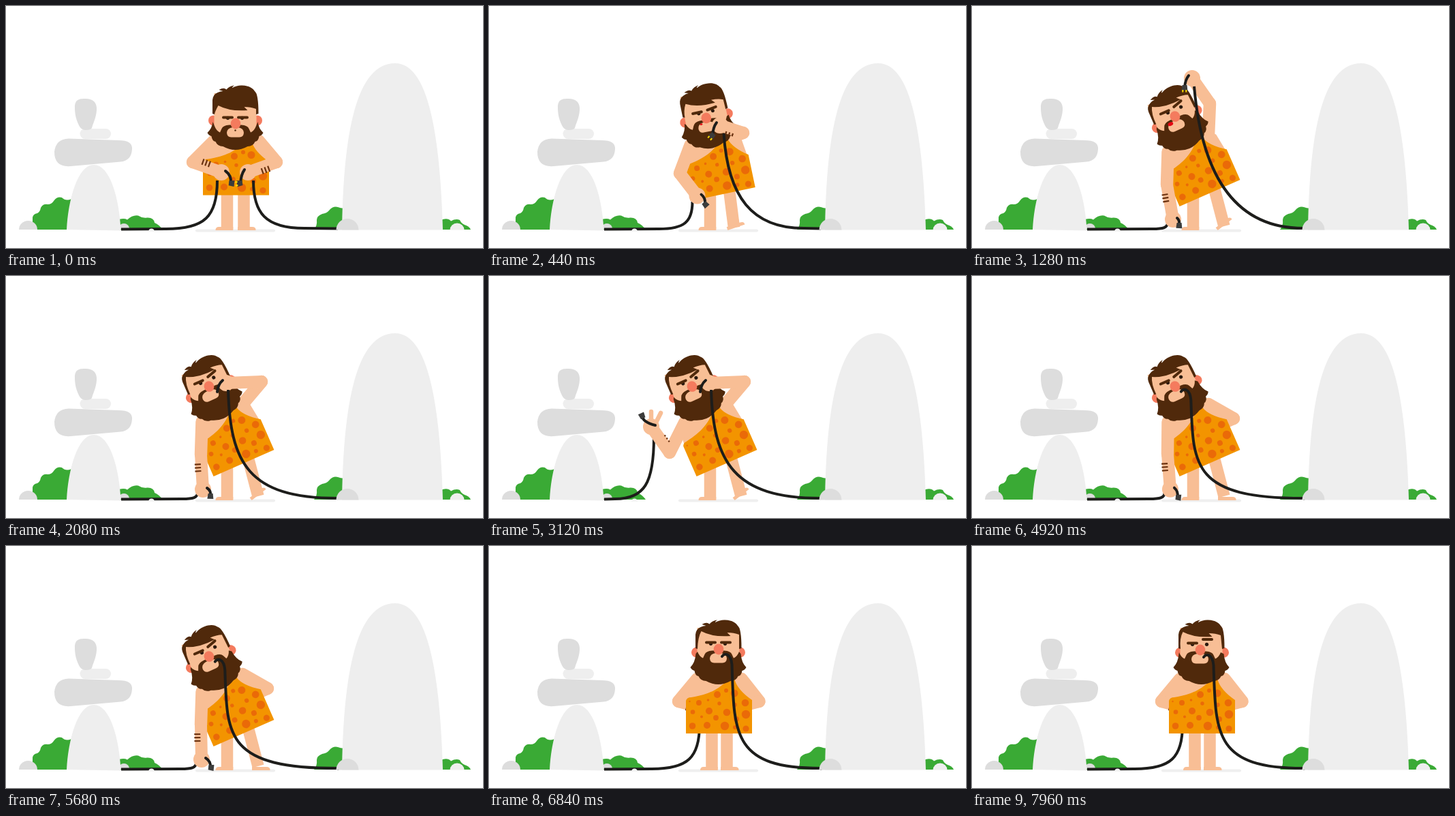
An HTML page with a canvas for the animation above (8 s loop, 700 px wide and 355 px high).

```html
<!DOCTYPE html>
<html lang="en">
<head>
<meta charset="utf-8">
<title>Caveman and cables</title>
<style>
html, body { margin: 0; width: 100%; height: 100%; overflow: hidden; background: #fff; }
canvas { display: block; }
</style>
</head>
<body>
<canvas id="stage" width="700" height="355"></canvas>
<script>
const ctx = document.getElementById('stage').getContext('2d');
const LOOP = 8000, STEP = 40, TILT = -23.7 * Math.PI / 180, GROUND = 327;
const SKIN = '#f8be95', HAIR = '#50290b', RED = '#f47b5e', CABLE = '#1d1d1b',
  LIGHT = '#eee', GREY = '#ddd', GREEN = '#3aaa35', DRESS = '#f39400', SPOT = '#ea6a08';

// Drawing helpers
function fill(color, d) {
  ctx.fillStyle = color;
  ctx.fill(new Path2D(d));
}
function disc(color, x, y, rx, ry = rx) {
  ctx.fillStyle = color;
  ctx.beginPath();
  ctx.ellipse(x, y, rx, ry, 0, 0, 7);
  ctx.fill();
}
function dome(color, x, y, r, h = r) {
  ctx.fillStyle = color;
  ctx.beginPath();
  ctx.ellipse(x, y, r, h, 0, Math.PI, 2 * Math.PI);
  ctx.fill();
}
function stroke(color, width, d, cap = 'round') {
  ctx.strokeStyle = color;
  ctx.lineWidth = width;
  ctx.lineCap = cap;
  ctx.lineJoin = 'round';
  ctx.stroke(new Path2D(d));
}
function group(x, y, angle, draw) {
  ctx.save();
  ctx.translate(x, y);
  ctx.rotate(angle);
  draw();
  ctx.restore();
}
const mix = (a, b, k) => Array.isArray(a) ? a.map((v, i) => mix(v, b[i], k))
  : typeof a === 'number' ? a + (b - a) * k : a;

// Poses: each key changes only the listed parts.
// l = left arm, r = right arm: E elbow, H hand, P plug, Turn plug angle, Front drawn over the dress, Band bracelet side
const keys = [
  { t: 0, lean: 0, drop: 2.5, neck: 5.5, look: [0, 13], brow: [1, 1, 0], eye: 0, open: 0, foot: 0,
    lE: [274, 229], lH: [316, 244], lP: [330, 260], lTurn: .1, lCable: [310, 256], lFront: true, lBand: 1, fingers: 0,
    rE: [397, 229], rH: [355, 244], rP: [344, 260], rTurn: 3, rCable: [8, 12], rFront: true, rBand: 1,
    sag: 380, bend: 0, rEnd: 438, bite: false, held: false },
  { t: 120 },
  { t: 760, lean: 1, drop: 0, neck: 0, look: [-1, 0], brow: [-1.7, -5.5, 2], eye: 4, open: 1, foot: -38,
    lE: [286, 262], lH: [295, 313], lP: [304, 321], lTurn: 1.6, lCable: [287, 318], lBand: -1,
    rE: [349, 143], rH: [323, 106], rP: [312, 119], rTurn: 1.6, rCable: [3, 12], rBand: 0,
    sag: 392, bend: 12, rEnd: 486 },
  { t: 1320 },
  { t: 1660, open: 0, eye: 2, rE: [375, 155], rH: [323, 157], rP: [310, 170], rCable: [3, 10], sag: 360, bend: 3, bite: true },
  { t: 2100, lH: [289, 313], lP: [300, 322], lCable: [281, 318], sag: 355 },
  { t: 2520, lH: [295, 313], lP: [304, 321], lCable: [287, 318], sag: 360 },
  { t: 2960, eye: 1, lE: [265, 259], lH: [238, 221], lP: [225, 206], lTurn: -2, lCable: [242, 236], lBand: -.25, fingers: 1 },
  { t: 3380, held: true },
  { t: 3760, eye: 4, lE: [287, 261], lH: [297, 312], lP: [303, 323], lTurn: 1.6, lCable: [289, 318], lBand: -1, fingers: 0,
    rE: [388, 158], rH: [407, 112], sag: 330, rBand: .5 },
  { t: 4160, foot: -8, lH: [301, 312], lP: [306, 324], lCable: [291, 318],
    rE: [392, 187], rH: [432, 212], rBand: 1, sag: 322 },
  { t: 4320, foot: 0 },
  { t: 4480, rFront: false },
  { t: 4760, rE: [384, 209], rH: [355, 222], rBand: 0, lH: [287, 313], lP: [300, 325], lTurn: .1, lCable: [279, 318] },
  { t: 5200, lH: [300, 312], lP: [306, 324], lCable: [291, 318], sag: 326 },
  { t: 5640, lE: [286, 262], lH: [287, 313], lP: [300, 325], lCable: [279, 318], sag: 322 },
  { t: 5940 },
  { t: 6240, lFront: false, lean: .5, lE: [276, 240], lH: [298, 262], lCable: [298, 280] },
  { t: 6640, lean: 0, look: [0, 0], brow: [0, 0, 0], eye: 0, lE: [278, 228], lH: [308, 236], lCable: [309, 262],
    rE: [396.5, 228], rH: [366, 236], sag: 358 },
  { t: 6900 },
  { t: 7240, look: [2, 0], sag: 361 },
  { t: 7480 },
  { t: 7800, look: [-2, 1], brow: [0, -5.5, 0], sag: 356 },
  { t: LOOP }
];
for (let i = 1; i < keys.length; i++) keys[i] = { ...keys[i - 1], ...keys[i] };

function poseAt(t) {
  const i = keys.findIndex(k => k.t > t), a = keys[i - 1], b = keys[i];
  const u = (t - a.t) / (b.t - a.t), k = u * u * (3 - 2 * u), pose = {};
  for (const name in a) pose[name] = mix(a[name], b[name], k);
  return pose;
}

function scenery() {
  fill(GREEN, 'M39,328V310Q40,305 46,304Q50,302 51,296Q54,290 61,291Q67,291 70,286Q75,279 82,281Q88,287 96,283L110,328Z');
  fill(GREEN, 'M160,315Q172,310 178,313.500Q186,306 194,307.500Q200,311.500 207,310.500Q217,310 218,318Q225,321 230,328H160Z');
  fill(GREEN, 'M452,328Q457,322 456,314Q456,308 464,305Q471,304 474,300Q480,293 487,295Q494,298 500,296V328Z');
  fill(GREEN, 'M638,314Q648,310 653,315.500Q660,311.500 666,314Q668,319 673,321Q680,323 682,328H638Z');
  dome(GREY, 32.5, 328, 13.5, 13);
  dome(GREY, 173, 327, 8);
  dome(LIGHT, 662, 328.5, 10.5, 10);
  fill(LIGHT, 'M89,328C91,285 105,233 129,233C152,233 166,280 168.5,329.5Z');
  fill(GREY, 'M92,194.500L165,197Q186,197 185,210Q184,227 168,228.500L95,235Q71,237 71,214Q73,195 92,194.500Z');
  stroke(LIGHT, 15, 'M116,187.500H146.500');
  fill(GREY, 'M101,149C101,137 107,136 117,136C127,136 134,141 133,153C132,165 128,171 126,179Q124,182 117,182Q110,182 107,175C102,165 101,156 101,149Z');
  fill(LIGHT, 'M493,328.500C495,190 513,84 571,84C620,84 637,190 641,328.500Z');
  stroke('#efefef', 4, 'M280,329.500H393');
}

function legs(p) {
  const x = 327 - 2.5 * p.lean - p.drop, footX = mix(340, 361, p.lean);
  stroke(SKIN, 17.5, `M${x},265V327`, 'butt');
  fill(SKIN, `M${x + 8.8},329H${x - 17}Q${x - 17},324 ${x - 12},324H${x + 8.8}Z`);
  stroke(SKIN, 17.5, `M${mix(349, 354, p.lean)},262L${mix(349, 370, p.lean)},${mix(327, 323, p.lean)}`, 'butt');
  group(footX, 329.5, p.foot * Math.PI / 180, () => fill(SKIN, 'M0,-.5H26.500Q27,-5.500 21,-5.500H0Z'));
}

const spots = [[-2.5, -57, 5], [10.5, -63, 3], [22.5, -59, 5.5], [-16, -49, 1.8], [-29.5, -45, 4], [-43, -47, 1.2],
  [.5, -44, 2.7], [38.5, -45, 5.3], [23, -42, 3.2], [-38.5, -31.5, 3.3], [-14.5, -33, 5], [11.5, -31, 5.3],
  [39.5, -28, 6.2], [-25.5, -24.5, 2], [-4.5, -23, 3.9], [25.5, -21, 4], [-39, -11, 4.8], [-17.5, -12, 5],
  [8.5, -11, 6.2], [23.5, -9, 3], [39.5, -7, 4.6]];

function torso() {
  fill(SKIN, 'M-33,-86H33L43,-75L47,-45H-47L-43,-75Z');
  fill(DRESS, 'M-48.500,-48Q-47,-53 -41,-53C-15,-57 0,-65 12,-78L23,-79Q27,-64 48.500,-49V0H-48.500Z');
  for (const [x, y, r] of spots) disc(SPOT, x, y, r);
}

function head(p) {
  const [lx, ly] = p.look, ear = ly * .3;
  const f = (x, y) => `${x + lx} ${y + ly}`;
  disc(RED, -32 - lx * .5, ear, 7.5);
  disc(RED, 32 - lx * .5, ear, 7.5);
  fill(SKIN, 'M-31,-36H31V24H-31Z');
  fill(HAIR, `M-33.500 -6V-26Q-33 -34 -26 -37Q-22 -39 -18 -39L-24 -41Q-17 -45 -13 -41.500Q-9 -46.500 -1.500 -47.500
    Q-5 -45 -4.500 -44Q3 -48 10 -47.500C21 -47 26 -43 28.500 -39Q34 -35 34 -6L30.500 -5L${f(30.5, -26)}
    Q${f(23, -29)} ${f(13, -29)}L${f(18, -24)}Q${f(-8, -22)} ${f(-25, -31)}Q${f(-30, -22)} -30.500 -5Z`);
  fill(HAIR, `M-33 ${2 + ear}Q-34 15 -41 22Q-39 26 -35 27Q-34 34 -29 35Q-26 42 -18 42Q-9 47 0 47
    Q9 47 18 42Q26 42 29 35Q34 34 35 27Q39 26 41 22Q34 15 33 ${2 + ear}L${f(30.5, -1)}
    Q${f(28, 6)} ${f(22.5, 8.5)}L${f(20, 3)}Q${f(18, -2)} ${f(9, -2.5)}H${-9 + lx}
    Q${f(-18, -2)} ${f(-20, 3)}L${f(-22.5, 8.5)}Q${f(-28, 6)} ${f(-30.5, -1)}Z`);
  group(lx, ly, 0, () => {
    group(-3 * p.lean, 0, 0, () => {
      fill(SKIN, 'M-12.500,9Q-12,2 -4,1H4Q12,2 12.500,9Q12,15.500 6,15.500H-6Q-12,15.500 -12.500,9Z');
      if (p.open > .1) disc('#e30613', -7, 3, 4 * p.open, 2.6 * p.open);
    });
    if (!p.held && p.lean < .3) disc(HAIR, 0, 5.5, 1.2);
    disc('#2b1a10', -11 + p.eye, -12.7 - p.lean, 2.6);
    disc('#2b1a10', 10 + p.eye, -12.7 - p.lean, 2.6);
    const [left, right, slant] = p.brow;
    stroke(HAIR, 4, `M-17.500,${left - 14.5}H-4.500`);
    stroke(HAIR, 4, `M4.500,${right - 14.5 + slant}L17.500,${right - 14.5 - slant}`);
    disc(RED, .5, -4.5, 7.3, 7.9);
  });
}

function upperArm(shoulder, elbow) {
  stroke(SKIN, 18.5, `M${shoulder}L${elbow}`);
}
function forearm(elbow, hand, band) {
  stroke(SKIN, 18, `M${elbow}L${hand}`);
  disc(SKIN, ...hand, 12);
  if (Math.abs(band) < .1) return;
  group(...elbow, Math.atan2(hand[1] - elbow[1], hand[0] - elbow[0]), () => {
    const edge = -10 * Math.sign(band), inner = edge + 9 * band;
    for (const x of [14, 19, 24]) stroke('#6b3210', 2.2, `M${x},${edge}V${inner}`, 'butt');
  });
}
function lead([x, y], [px, py], turn, plug, prongs) {
  stroke(CABLE, 4, `M${x},${y}Q${px + 1},${mix(y, py, .35)} ${px},${py}`);
  if (plug) group(px, py, turn, () => {
    fill('#3c3c3b', 'M-3,-3.500L5,-4.500V4.500L-3,3.500Z');
    if (prongs) fill('#ffde00', 'M4,-3.500H7.500V-1.500H4ZM4,1.500H7.500V3.500H4Z');
  });
}

function leftArm(p, shoulder) {
  const [x, y] = p.lCable, [hx, hy] = p.lH;
  const end = Math.max(185, x - 15 - .85 * (GROUND - y));
  stroke(CABLE, 4, `M${x},${y}C${x},${mix(y, GROUND, .75)} ${mix(x, end, .25)},${GROUND} ${end},${GROUND}L169,327.500`, 'butt');
  upperArm(shoulder, p.lE);
  forearm(p.lE, p.lH, p.lBand);
  if (p.fingers > .05) {
    stroke(SKIN, 6.5, `M${hx},${hy}l0,${-22 * p.fingers}M${hx + 4},${hy}l${10 * p.fingers},${-20 * p.fingers}`);
  }
  if (p.lFront) lead([hx + 6, hy - 2], p.lP, p.lTurn, true, false);
}

function rightCable(p, mouth) {
  const [x, y] = p.held ? [mouth[0] + 14.5, mouth[1] + 12] : [p.rH[0] + p.rCable[0], p.rH[1] + p.rCable[1]];
  const [mx, my] = mouth;
  const start = p.held ? `M${mx},${my}C${mx + 4},${my - 6} ${mx + 13},${my - 4} ${x},${y}` : `M${x},${y}`;
  stroke(CABLE, 4, `${start}C${x + p.bend},${mix(y, 326, .67)} ${p.sag},326 ${p.rEnd},326L487,326.500`, p.held ? 'round' : 'butt');
  if (!p.held) lead([p.rH[0] - 5, p.rH[1] - 4], p.rP, p.rTurn, !p.bite, true);
}

function draw(t) {
  const p = poseAt(t), angle = TILT * p.lean;
  const x0 = mix(337.5, 349, p.lean), y0 = 275 - .5 * p.lean + p.drop;
  const onBody = (x, y) => [x0 + x * Math.cos(angle) - y * Math.sin(angle), y0 + x * Math.sin(angle) + y * Math.cos(angle)];
  const headY = p.neck - 119;
  const left = onBody(-32, -80), right = onBody(33, -80), mouth = onBody(4.5 + p.look[0], headY + 6 + p.look[1]);

  ctx.fillStyle = '#fff';
  ctx.fillRect(0, 0, 700, 355);
  scenery();
  legs(p);
  upperArm(right, p.rE);
  if (!p.rFront) forearm(p.rE, p.rH, p.rBand);
  if (!p.lFront) leftArm(p, left);
  group(x0, y0, angle, torso);
  if (p.lFront) leftArm(p, left);
  group(...onBody(-1, headY), angle, () => head(p));
  if (p.rFront) forearm(p.rE, p.rH, p.rBand);
  rightCable(p, mouth);
  dome(GREY, 501, 328.5, 16.5);
  dome('#f4f4f4', 213.5, 331, 4.5);
}

function frame() {
  draw(Math.floor(performance.now() % LOOP / STEP) * STEP);
  requestAnimationFrame(frame);
}
frame();
</script>
</body>
</html>
```
